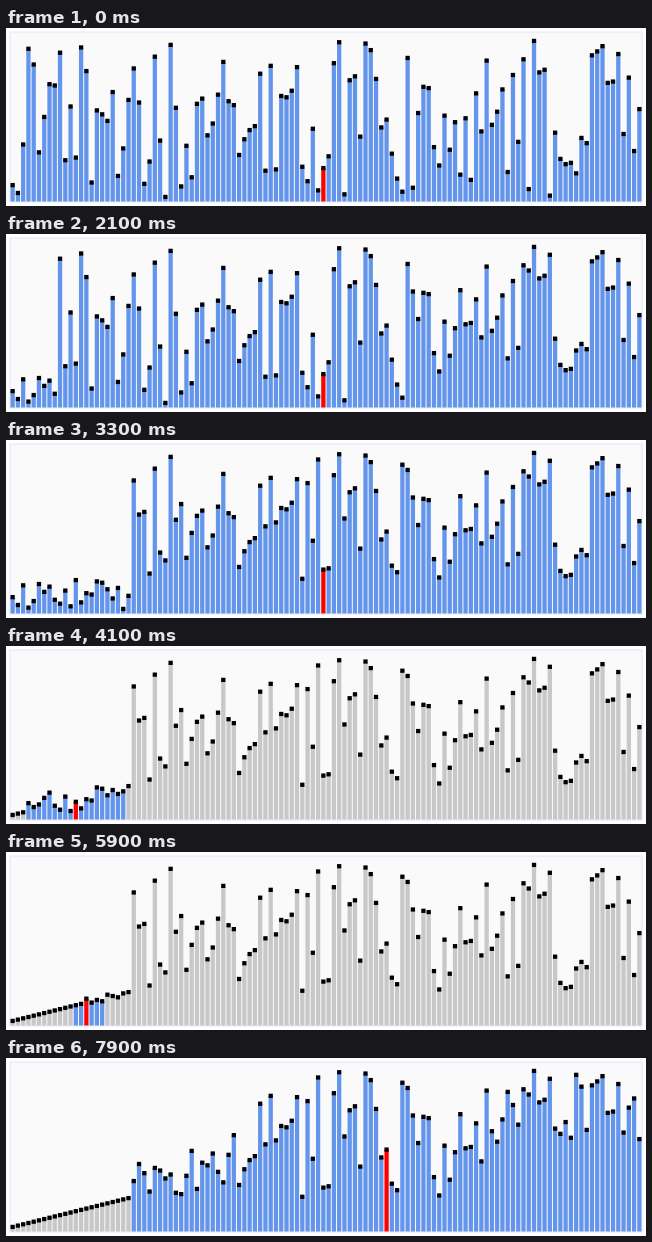
Animation, 640 px wide and 178 px high, one loop 8 s. Source, as a matplotlib script:

```python
from itertools import islice

import matplotlib.pyplot as plt
import numpy as np
from matplotlib.animation import FuncAnimation
from matplotlib.collections import PolyCollection
from matplotlib.patches import Rectangle

WIDTH, HEIGHT, DPI = 640, 178, 100
FRAMES, INTERVAL, HOLD = 80, 100, 15
LEFT, RIGHT, TOP, BOTTOM = 4, 636, 4, 174
ACTIVE, PIVOT, IDLE = "cornflowerblue", "red", "#c8c8c8"

# Distance of each bar's tip from the top; only the ranking matters.
TIPS = np.array([
    157, 165, 117, 21, 37, 124, 89, 56, 57, 25, 132, 79, 130, 19, 43,
    155, 83, 86, 93, 64, 148, 121, 72, 41, 75, 156, 134, 29, 113, 169,
    17, 80, 159, 118, 149, 76, 71, 107, 96, 67, 34, 73, 77, 127, 111,
    102, 98, 46, 143, 38, 142, 68, 69, 63, 39, 139, 153, 101, 163, 140,
    128, 35, 14, 167, 52, 48, 109, 16, 22, 51, 100, 92, 126, 151, 164,
    30, 160, 85, 59, 60, 119, 138, 88, 122, 94, 147, 90, 152, 66, 104,
    33, 97, 84, 62, 144, 47, 114, 31, 161, 13, 44, 42, 168, 105, 131,
    136, 135, 145, 110, 115, 27, 23, 18, 55, 54, 26, 106, 50, 123, 81,
])
COUNT = len(TIPS)
CELL = (RIGHT - LEFT) / COUNT
BAR = CELL - 1
STEP = 1.311


def quicksort(a, lo, hi, announce=True):
    """Hoare partition around the middle, yielding (values, lo, hi, mid)."""
    if np.all(np.diff(a[lo:hi + 1]) > 0):
        return
    mid = (lo + hi) // 2
    pivot = a[mid]
    if announce:
        yield a.copy(), lo, hi, mid
    i, j = lo, hi
    while i <= j:
        while a[i] < pivot:
            i += 1
        while a[j] > pivot:
            j -= 1
        if i <= j:
            a[i], a[j] = a[j], a[i]
            i, j = i + 1, j - 1
            yield a.copy(), lo, hi, mid
    yield from quicksort(a, lo, j, False)
    yield from quicksort(a, i, hi, lo < j)


def boxes(x, width, top, bottom):
    x0, x1, y0, y1 = np.broadcast_arrays(x, x + width, top, bottom)
    return np.stack([np.stack(p, -1) for p in
                     ((x0, y0), (x1, y0), (x1, y1), (x0, y1))], 1)


ranks = COUNT - np.argsort(np.argsort(TIPS))
states = list(islice(quicksort(ranks, 0, COUNT - 1), FRAMES - HOLD + 1))
bar_x = LEFT + 0.5 + CELL * np.arange(COUNT)

fig = plt.figure(figsize=(WIDTH / DPI, HEIGHT / DPI), dpi=DPI, facecolor="white")
ax = fig.add_axes([0, 0, 1, 1])
ax.set(xlim=(0, WIDTH), ylim=(HEIGHT, 0))
ax.axis("off")
ax.add_patch(Rectangle((LEFT, TOP), RIGHT - LEFT, BOTTOM - TOP, fc="#fafafa",
                       ec="lavender", lw=72 / DPI, snap=False))
bars = PolyCollection([], linewidths=0, snap=False, zorder=2)
caps = PolyCollection([], linewidths=0, snap=False, zorder=3, facecolors="black")
ax.add_collection(bars, autolim=False)
ax.add_collection(caps, autolim=False)


def draw(frame):
    values, lo, hi, mid = states[max(0, frame - HOLD + 1)]
    tops = 168.1 - STEP * values
    bars.set_verts(boxes(bar_x, BAR, tops + BAR / 2, BOTTOM - 0.5))
    caps.set_verts(boxes(bar_x, BAR, tops, tops + BAR))
    bars.set_facecolor([PIVOT if k == mid else ACTIVE if lo <= k <= hi else IDLE
                        for k in range(COUNT)])
    return bars, caps


anim = FuncAnimation(fig, draw, frames=FRAMES, interval=INTERVAL,
                     repeat=True, repeat_delay=0)
plt.show()
```
